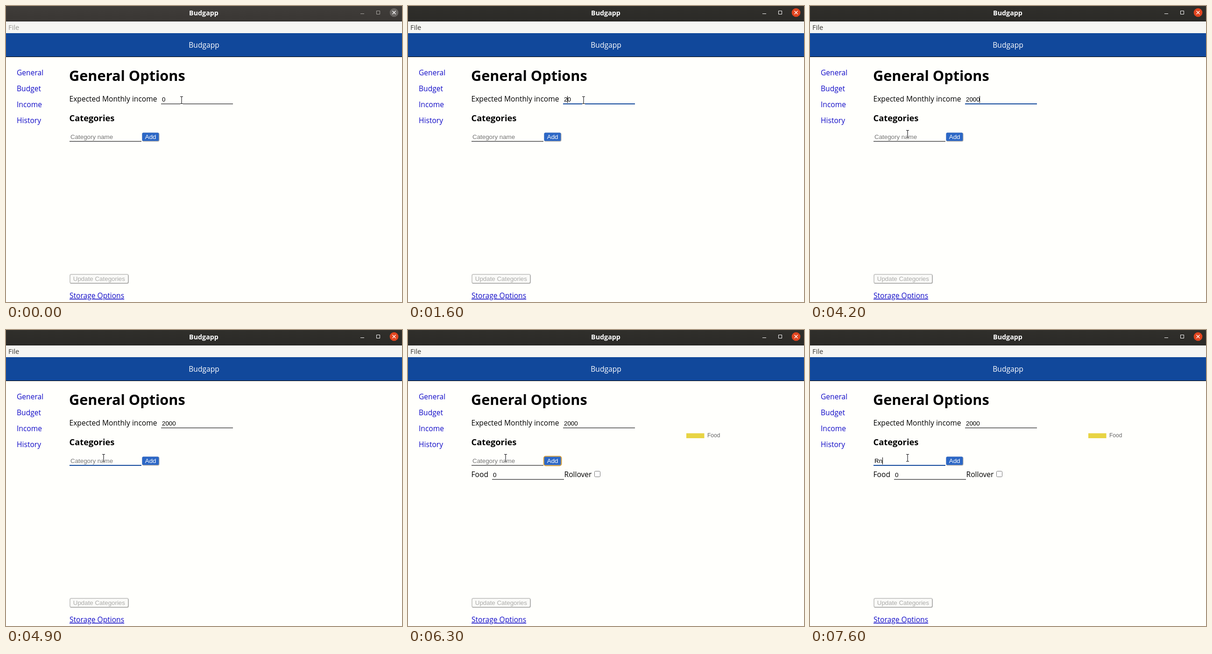
These frames come from a looping animation (848x632 px, 8000 ms). An HTML page:

```html
<!DOCTYPE html>
<html lang="en">
<head>
<meta charset="utf-8">
<title>Budgapp</title>
<style>
  html, body { margin: 0; width: 100%; height: 100%; overflow: hidden; background: #fffffc; }
  svg { display: block; width: 848px; height: 632px; }
  text { font: 15.6px "Open Sans", "Noto Sans", sans-serif; white-space: pre; }
  .bold { font-weight: 700; }
  .mid { text-anchor: middle; }
  .field, .btn { font: 13.333px "Liberation Sans", Arial, sans-serif; }
  .hint { fill: #757575; }
  .link { fill: #120cc8; }
  .line { fill: #767676; }
  .line.on { fill: #11489b; }
  #file { font-size: 14.8px; fill: #9b9a96; }
  #barTop { stop-color: #403d3a; }
  #barEnd { stop-color: #393633; }
  #close { fill: #686562; }
  #ctl { stroke: #a9a6a2; }
  .active #file { fill: #3c3b37; }
  .active #barTop { stop-color: #302f2b; }
  .active #barEnd { stop-color: #2b2a27; }
  .active #close { fill: #e2451f; }
  .active #ctl { stroke: #fff; }
</style>
</head>
<body>
<svg id="app" viewBox="0 0 848 632" xmlns="http://www.w3.org/2000/svg">
  <defs>
    <linearGradient id="bar" x2="0" y2="1">
      <stop id="barTop" offset="0"/><stop id="barEnd" offset="1"/>
    </linearGradient>
  </defs>
  <rect width="848" height="632" fill="#fffffc"/>

  <rect width="848" height="33" fill="url(#bar)"/>
  <rect y="32" width="848" height="1" fill="#22211f"/>
  <text class="bold mid" x="423.5" y="20" fill="#fff" style="font-size:14.3px">Budgapp</text>
  <g id="ctl" fill="none"><path d="M759 16.5h8M793.5 10.5h7v7h-7z"/></g>
  <circle id="close" cx="831" cy="14" r="9.3"/>
  <path d="M827.5 10.5l7 7m0-7l-7 7" stroke="#fff" stroke-width="1.4"/>

  <rect y="33" width="848" height="25" fill="#f6f6f3"/>
  <text id="file" x="5" y="51">File</text>
  <rect y="58" width="848" height="50" fill="#11489b"/>
  <rect y="108" width="848" height="1" fill="#000"/>
  <text class="mid" x="424" y="89" fill="#fff">Budgapp</text>

  <g class="link">
    <text x="23" y="148">General</text>
    <text x="23" y="182">Budget</text>
    <text x="23" y="216">Income</text>
    <text x="23" y="250">History</text>
    <text x="136" y="624" text-decoration="underline">Storage Options</text>
  </g>

  <text class="bold" x="135" y="160" style="font-size:30.7px">General Options</text>
  <text x="135.5" y="204">Expected Monthly income</text>
  <text class="bold" x="135.5" y="246" style="font-size:18.3px">Categories</text>

  <rect id="incomeLine" class="line" x="332" y="208" width="154" height="2"/>
  <text id="income" class="field" x="334" y="204"></text>
  <rect id="incomeCaret" y="192" width="1" height="15"/>

  <rect id="nameLine" class="line" x="136" y="288" width="154" height="2"/>
  <text id="hint" class="field hint" x="138" y="284">Category name</text>
  <text id="name" class="field" x="138" y="284"></text>
  <rect id="nameCaret" y="272" width="1" height="15"/>

  <rect x="291.5" y="270.5" width="37" height="19" rx="3.5" fill="#a9a9a8"/>
  <rect x="291.5" y="270.5" width="35.7" height="17.6" rx="2.5" fill="#2c67c6"/>
  <rect id="ring" x="290.8" y="269.6" width="37.8" height="20" rx="4" fill="none" stroke="#d39c35" stroke-width="1.8"/>
  <text class="btn" x="297.8" y="284" fill="#fff">Add</text>

  <g id="row">
    <text x="135.5" y="314">Food</text>
    <rect class="line" x="180" y="318" width="154" height="2"/>
    <text class="field" x="182" y="314">0</text>
    <text x="334.5" y="314">Rollover</text>
    <rect x="399.5" y="301.5" width="12" height="12" rx="2" fill="#fff" stroke="#767676"/>
  </g>
  <g id="legend">
    <rect x="596" y="220.5" width="38.5" height="10.5" fill="#e8d444"/>
    <text class="field" x="641" y="229" fill="#666" style="font-size:12px">Food</text>
  </g>

  <rect x="137" y="573" width="125" height="19" rx="3" fill="#fafaf8" stroke="#cbcbc9" stroke-width="2"/>
  <path d="M138 592h121q3 0 3-3v-14" fill="none" stroke="#b3b3b1" stroke-width="2"/>
  <text class="btn" x="143.8" y="587" fill="#ababa9">Update Categories</text>

  <g id="mouse" fill="none">
    <path d="M-3 -7.5h2.2l.8 .8l.8 -.8h2.2M0 -7v14M-3 7.5h2.2l.8 -.8l.8 .8h2.2" stroke="#fff" stroke-width="3"/>
    <path d="M-3 -7.5h2.2l.8 .8l.8 -.8h2.2M0 -7v14M-3 7.5h2.2l.8 -.8l.8 .8h2.2" stroke="#111" stroke-width="1.1"/>
  </g>
</svg>
<script>
  const LOOP = 8000;
  const $ = id => document.getElementById(id);
  const show = (id, on) => { $(id).style.display = on ? '' : 'none'; };

  // [start ms, text, caret index (-1: hidden)]
  const incomeSteps = [
    [0, '0', -1], [300, '0', 1], [900, '0', -1], [1300, '0', 0],
    [1600, '20', 1], [2200, '20', -1], [2300, '20', 2], [2600, '200', 3],
    [2800, '2000', 4], [3400, '2000', -1], [3900, '2000', 4], [4400, '2000', -1]
  ];
  const nameSteps = [
    [0, '', -1], [4400, '', 0], [4900, '', -1], [5000, 'F', 1], [5300, 'Fo', 2],
    [5500, 'Foo', 3], [5600, 'Food', 4], [5900, 'Food', -1], [6200, '', -1],
    [6700, '', 0], [7400, 'R', 1], [7600, 'Rn', 2]
  ];

  function drawField(id, left, steps, t, focused) {
    const [, text, caret] = steps.filter(s => s[0] <= t).pop();
    const node = $(id);
    if (node.textContent !== text) node.textContent = text;
    show(id + 'Caret', caret >= 0);
    const offset = caret > 0 ? node.getSubStringLength(0, caret) : 0;
    $(id + 'Caret').setAttribute('x', Math.floor(left + offset));
    $(id + 'Line').classList.toggle('on', focused);
    return text;
  }

  function draw(t) {
    const within = (a, b) => t >= a && t < b;
    $('app').classList.toggle('active', t >= 300);
    drawField('income', 334, incomeSteps, t, within(300, 4400));
    const name = drawField('name', 138, nameSteps, t, within(4400, 5900) || t >= 6700);
    show('hint', !name);
    show('ring', within(5900, 6700));
    show('row', t >= 6200);
    show('legend', t >= 6300);

    // the pointer moves in six 100 ms hops
    const k = Math.min(6, Math.max(0, Math.floor((t - 3600) / 100))) / 6;
    const p = k * k * (3 - 2 * k);
    const x = Math.round(376 - 167 * p), y = Math.round(201 + 72 * p);
    $('mouse').setAttribute('transform', `translate(${x} ${y})`);
  }

  const start = performance.now();
  function tick() {
    draw((performance.now() - start) % LOOP);
    requestAnimationFrame(tick);
  }
  tick();
</script>
</body>
</html>
```
